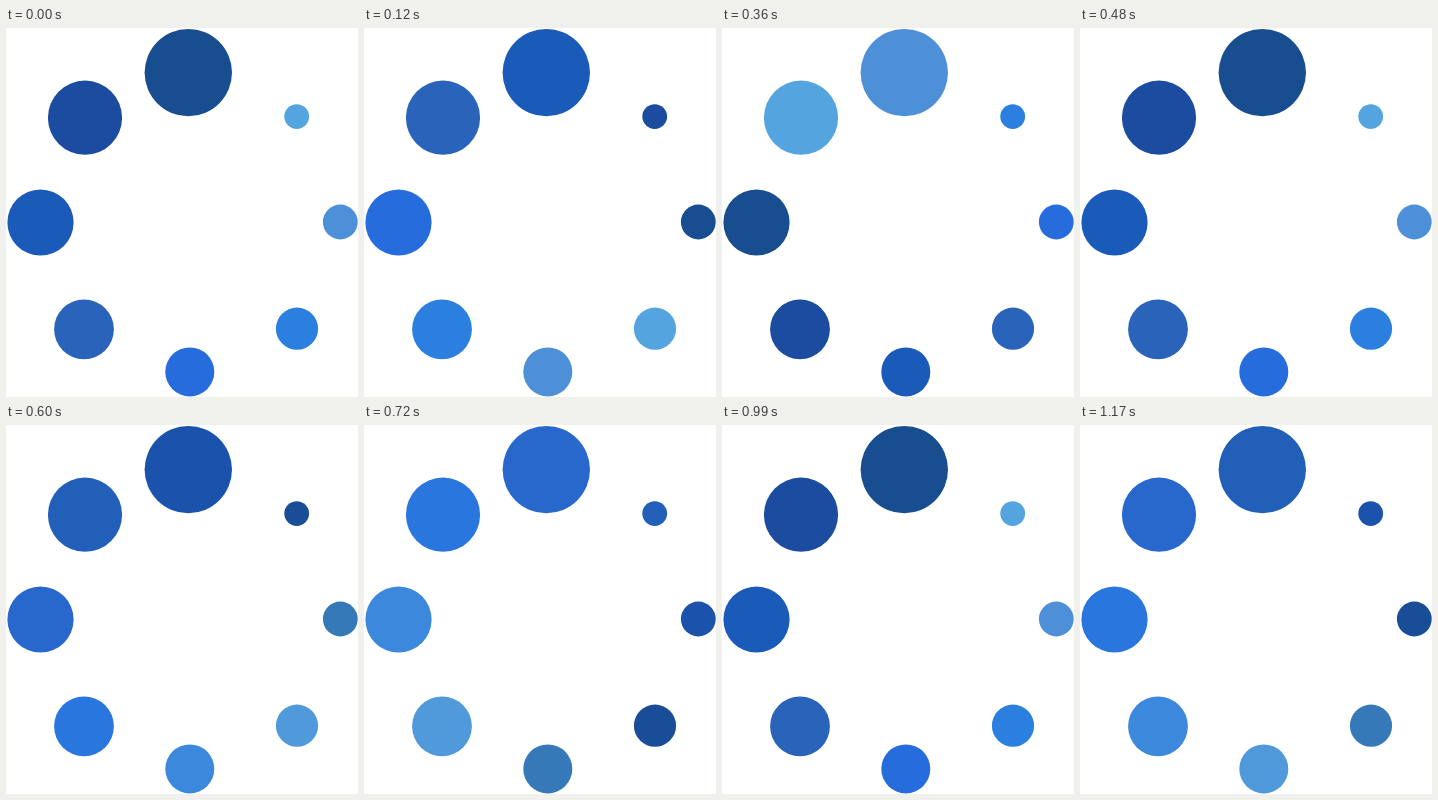
Animation, 352 px wide and 369 px high, one loop 1.2 s. Source, as an HTML page:

```html
<!DOCTYPE html>
<html lang="en">
<head>
<meta charset="utf-8">
<title>Loading spinner</title>
<style>
  html, body { margin: 0; width: 100%; height: 100%; overflow: hidden; background: #fff; }
  svg { display: block; width: 352px; height: 369px; }
</style>
</head>
<body>
<svg viewBox="0 0 352 369">
  <circle cx="182.3" cy="44.6" r="43.7"/>
  <circle cx="79" cy="89.7" r="37.1"/>
  <circle cx="34.5" cy="194.5" r="33.1"/>
  <circle cx="78" cy="301.3" r="29.9"/>
  <circle cx="183.8" cy="343.9" r="24.5"/>
  <circle cx="291" cy="300.7" r="21.1"/>
  <circle cx="334.3" cy="194" r="17.4"/>
  <circle cx="290.7" cy="88.6" r="12.4"/>
</svg>
<script>
  const LOOP = 1200, TICK = 30;
  const TURN = 17; // 16 half steps, the closing one held twice
  const palette = [
    [24, 77, 144], [27, 76, 159], [26, 90, 184], [42, 100, 186],
    [38, 108, 221], [42, 127, 223], [77, 144, 216], [83, 164, 223]
  ];
  const dots = document.querySelectorAll('circle');

  function colorAt(pos) {
    const i = Math.floor(pos), k = pos - i;
    const a = palette[i % 8], b = palette[(i + 1) % 8];
    return `rgb(${a.map((v, c) => Math.round(v + (b[c] - v) * k))})`;
  }

  function draw(now) {
    const shift = Math.floor((now % LOOP) / TICK) % TURN / 2;
    dots.forEach((dot, i) => dot.setAttribute('fill', colorAt(i + shift)));
  }

  function frame() {
    draw(performance.now());
    requestAnimationFrame(frame);
  }
  draw(0);
  requestAnimationFrame(frame);
</script>
</body>
</html>
```
